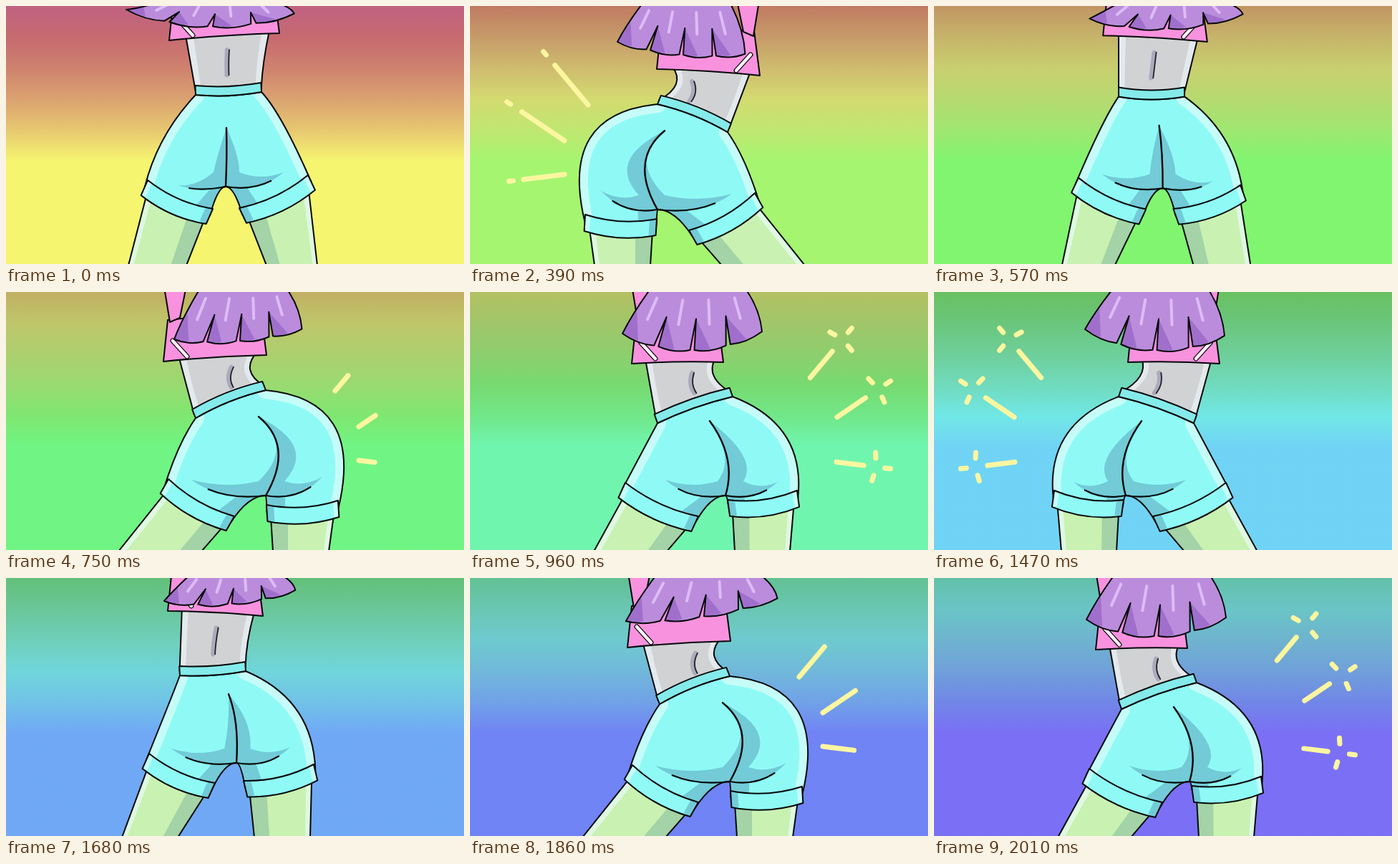
An HTML page for the animation above (2040 ms loop, 640x360 px).

```html
<!DOCTYPE html>
<html lang="en">
<head>
<meta charset="utf-8">
<title>Dance loop</title>
<style>
html, body { margin: 0; width: 100%; height: 100%; overflow: hidden; }
svg { display: block; width: 100vw; height: 100vh; }
</style>
</head>
<body>
<svg viewBox="0 0 640 360" preserveAspectRatio="none">
  <defs>
    <linearGradient id="sky" x1="0" y1="0" x2="0" y2="1"></linearGradient>
    <clipPath id="inShorts"><path id="shortsClip"/></clipPath>
  </defs>
  <rect width="640" height="360" fill="url(#sky)"/>
  <g id="figure" stroke-linecap="round" stroke-linejoin="round"></g>
</svg>
<script>
const LOOP = 2040, STEP = 30, BEAT = 510, FIRST_HIT = 240, MIRROR = 625;
const INK = '#050808', CLOTH = '#8ffaf5', CLOTH_DARK = '#72cbd7', CLOTH_LIGHT = '#c6fcf8';
const PINK = '#f992de', HAIR = '#bb8cdc', HAIR_DARK = '#a06fcc', HAIR_LIGHT = '#dcbcf6';

// Key points of the dance to the left; the other side is the mirror image.
// leg: hip bulge, outer and inner cuff end, outer and inner foot, cheek tip
const hit = {
  hem: [[261, 88], [405, 97]], waist: [[262, 137], [360, 176]], hair: [[206, 50], [390, 66]], sag: 10,
  crease: [[272, 174], [222, 215], [262, 284]],
  legA: [[124, 150], [161, 291], [261, 297], [174, 362], [252, 362], [183, 258]],
  legB: [[384, 210], [398, 261], [306, 313], [468, 362], [352, 362], [366, 262]]
};
const recoil = {
  hem: [[271, 98], [399, 100]], waist: [[258, 146], [363, 183]], hair: [[211, 52], [412, 58]], sag: 26,
  crease: [[290, 180], [252, 232], [268, 284]],
  legA: [[156, 185], [168, 277], [265, 290], [178, 362], [255, 362], [195, 265]],
  legB: [[380, 215], [408, 266], [306, 313], [452, 362], [350, 362], [352, 262]]
};
const up = {
  hem: [[243, 38], [397, 48]], waist: [[268, 120], [360, 124]], hair: [[215, 8], [457, 5]], sag: 22,
  crease: [[317, 170], [316, 210], [318, 252]],
  legA: [[240, 150], [203, 236], [299, 282], [190, 362], [261, 362], [237, 232]],
  legB: [[413, 180], [427, 243], [336, 283], [454, 362], [373, 362], [385, 250]]
};
const drop = {
  hem: [[226, 46], [359, 53]], waist: [[243, 136], [335, 130]], hair: [[221, 32], [410, 15]], sag: 12,
  crease: [[311, 162], [326, 200], [322, 258]],
  legA: [[230, 170], [200, 245], [292, 286], [162, 362], [240, 362], [231, 238]],
  legB: [[430, 170], [430, 260], [332, 283], [425, 362], [347, 362], [397, 236]]
};

const clamp = (v, lo, hi) => Math.max(lo, Math.min(hi, v));
const add = (p, x, y) => [p[0] + x, p[1] + y];

// Blends numbers, points, lists and whole poses alike.
function mix(a, b, f) {
  if (typeof a === 'number') return a + (b - a) * f;
  if (Array.isArray(a)) return a.map((v, i) => mix(v, b[i], f));
  return Object.fromEntries(Object.keys(a).map(k => [k, mix(a[k], b[k], f)]));
}

function flip(p) {
  const over = pts => pts.map(([x, y]) => [MIRROR - x, y]);
  return {
    hem: over(p.hem).reverse(), waist: over(p.waist).reverse(), hair: over(p.hair).reverse(),
    sag: p.sag, crease: over(p.crease), legA: over(p.legB), legB: over(p.legA)
  };
}

// Pose at each phase of a beat; the last key is the hit on the other side.
const KEYS = [[0, hit], [150, hit], [210, recoil], [240, recoil], [270, up], [420, drop], [BEAT, flip(hit)]];

function poseAt(phase, side) {
  const i = KEYS.findLastIndex(k => k[0] <= phase);
  const [t0, a] = KEYS[i], [t1, b] = KEYS[i + 1];
  const pose = mix(a, b, (phase - t0) / (t1 - t0));
  const flare = phase < 150 ? Math.sin(Math.PI * phase / 150) : 0;
  pose.hair = [add(pose.hair[0], -18 * flare, -25 * flare), add(pose.hair[1], 18 * flare, -6 * flare)];
  return side ? flip(pose) : pose;
}

// Fills a command template such as 'MQLZ' with points.
function trace(template, pts) {
  const need = { M: 1, L: 1, Q: 2, Z: 0 };
  let i = 0;
  return [...template].map(c => c + pts.slice(i, i += need[c])
    .map(p => p.map(v => v.toFixed(1)).join(' ')).join(' ')).join('');
}

const draw = (d, fill, stroke = 'none', width = 2, extra = '') =>
  `<path d="${d}" fill="${fill}" stroke="${stroke}" stroke-width="${width}" ${extra}/>`;
const filled = (template, pts, fill) => draw(trace(template, pts), fill);
const inked = (template, pts, fill) => draw(trace(template, pts), fill, INK);
const line = (template, pts, color = INK, width = 2, extra = '') =>
  draw(trace(template, pts), 'none', color, width, extra);

// A strip along edge a, reaching the fraction f of the way to edge b.
const strip = (a, b, f, fill) =>
  filled(a.length > 2 ? 'MQLQZ' : 'MLLLZ', [...a, ...mix(a, b, f).reverse()], fill);

// The segment ab moved downwards by d at a right angle.
function below([a, b], d) {
  const x = b[0] - a[0], y = b[1] - a[1], k = d * Math.sign(x) / Math.hypot(x, y);
  return [add(a, -y * k, x * k), add(b, -y * k, x * k)];
}

// The curve from a to b that sags downwards, as three points.
function bowed([a, b], sag) {
  const [c, d] = below([a, b], sag);
  return [a, mix(c, d, .5), b];
}

const cuffLine = (leg, drop) => bowed(below([leg[1], leg[2]], drop), 13);

function drawLeg(leg) {
  const [outTop, , inTop] = cuffLine(leg, 14);
  const outer = [mix(outTop, inTop, .06), leg[3]], inner = [mix(inTop, outTop, .05), leg[4]];
  return filled('MLLLZ', [...outer, ...[...inner].reverse()], '#c8f1b2') +
    strip(inner, outer, .27, '#a3d3a6') + strip(outer, inner, .09, '#dff8e2') +
    line('ML', outer) + line('ML', inner);
}

function drawCuff(leg) {
  const top = cuffLine(leg, 0), low = cuffLine(leg, 23);
  const band = [...top, ...[...low].reverse()];
  return filled('MQLQZ', band, CLOTH) + strip([top[2], low[2]], [top[0], low[0]], .1, CLOTH_DARK) +
    strip([top[0], low[0]], [top[2], low[2]], .07, CLOTH_LIGHT) + line('MQLQZ', band);
}

// Shadow between the crease and the lower edge of one cheek.
function cheek(tip, [top, bend, fork], width) {
  const dir = Math.sign(tip[0] - fork[0]);
  const low = [mix(tip[0], fork[0], .4), fork[1] + 8];
  const notch = add(fork, dir * (10 + width), -20);
  return {
    shade: filled('MQQQQZ', [tip, low, fork, bend, top, add(bend, dir * width * 2, 0), notch,
      add(mix(tip, notch, .5), 0, 12), tip], CLOTH_DARK),
    fold: line('MQ', [fork, low, tip], INK, 2.2, 'pathLength="100" stroke-dasharray="75 200"')
  };
}

function drawShorts({ waist, legA, legB, crease }, slope, bow) {
  const fork = crease[2], a = cuffLine(legA, 10), b = cuffLine(legB, 10).reverse();
  const arch = p => [mix(p[0], fork[0], .5), fork[1]];
  const body = trace('MQQQQQQQZ', [waist[0], legA[0], a[0], a[1], a[2], arch(a[2]), fork,
    arch(b[0]), b[0], b[1], b[2], legB[0], waist[1], ...bowed(waist, bow).slice(0, 2).reverse()]);
  document.getElementById('shortsClip').setAttribute('d', body);
  const cheeks = [cheek(legA[5], crease, Math.max(0, 8 + 20 * slope)),
    cheek(legB[5], crease, Math.max(0, 8 - 20 * slope))];
  const under = (inner, outer, tip) => filled('MLLLZ',
    [fork, inner, mix(inner, outer, .25), add(mix(fork, tip, .35), 0, 6)], CLOTH_DARK);
  return draw(body, CLOTH) + '<g clip-path="url(#inShorts)">' +
    under(a[2], a[0], legA[5]) + under(b[0], b[2], legB[5]) +
    line('MQMQ', [waist[0], legA[0], a[0], waist[1], legB[0], b[2]], CLOTH_LIGHT, 24) +
    cheeks.map(c => c.shade).join('') + '</g>' + draw(body, 'none', INK) +
    cheeks.map(c => c.fold).join('') + line('MQ', crease, INK, 2.4);
}

function drawWaist(waist, bow) {
  return inked('MQLQZ', [...bowed(below(waist, -13), bow), ...bowed(waist, bow).reverse()], '#84ebea');
}

function drawTorso({ hem, waist }, slope) {
  const belt = below(waist, -6), pinch = 75 * slope;
  const top = [mix(hem[0], hem[1], .15), mix(hem[0], hem[1], .91)].map(p => add(p, 0, -5));
  const side = (i, x) => [top[i], add(mix(top[i], belt[i], .55), x, 0), belt[i]];
  const left = side(0, Math.max(0, pinch)), right = side(1, Math.min(0, pinch));
  const outline = [...left, ...[...right].reverse()];
  const from = mix(top[0], top[1], .5 - .5 * slope), to = mix(belt[0], belt[1], .5 - .15 * slope);
  const navel = [mix(from, to, .3), add(mix(from, to, .55), 20 * slope, 0), mix(from, to, .75)];
  return filled('MQLQZ', outline, '#d0d2d4') + strip(left, right, .09, '#e3e9ec') +
    strip(right, left, .09, '#e3e9ec') + line('MQ', navel.map(p => add(p, -3, 0)), '#aaaabb', 6) +
    line('MQ', navel, '#202028', 1.8) + line('MQLQZ', outline);
}

// The arm and the strap are on the side towards which the waist slopes down.
function drawShirt([left, right], slope) {
  const dir = slope < 0 ? -1 : 1, corner = slope < 0 ? left : right;
  const at = (x, y) => add(corner, dir * x, y);
  const strap = [at(-33, -7), at(-13, -29)];
  return inked('MLQLZ', [add(left, 6, -58), left, add(mix(left, right, .5), 0, -3), right,
    add(right, -8, -62)], PINK) +
    line('ML', strap, INK, 7) + line('ML', strap, '#fff0fc', 4.5) +
    inked('MLLLZ', [at(-33, -110), at(0, -110), at(-9, -55), at(-23, -61)], PINK);
}

function drawHair([left, right], sag) {
  const LOCKS = 4;
  const edge = f => add(mix(left, right, f), 0, sag * 4 * f * (1 - f));
  const root = f => [mix(left[0], right[0], .2 + .65 * f), -6];
  const notch = f => mix(root(f), edge(f), .5);
  const outline = [root(0)];
  let detail = '';
  for (let i = 0; i < LOCKS; i++) {
    const from = i / LOCKS, to = (i + .88) / LOCKS, mid = (from + to) / 2, end = (i + 1) / LOCKS;
    const belly = add(edge(mid), 0, 6);
    const start = i ? [] : [add(mix(root(0), edge(0), .5), -6, 4)];
    outline.push(...start, edge(from), belly, edge(to));
    if (i < LOCKS - 1) outline.push(notch(end));
    detail += filled('MLQZ', [notch(from), edge(from), mix(edge(from), belly, .5), edge(mid)], HAIR_DARK) +
      line('ML', [mix(root(mid), edge(mid), .2), mix(root(mid), edge(mid), .6)], HAIR_LIGHT, 4);
  }
  outline.push(add(mix(root(1), edge(1), .5), 6, 0), root(1));
  const template = 'MQQ' + 'LLQ'.repeat(LOCKS - 1) + 'QZ';
  return filled(template, outline, HAIR) + detail + line(template, outline);
}

function burst(phase, side) {
  if (phase > 240) return '';
  const near = clamp((phase - 150) * .4, 0, 30), far = Math.min(72, 28 + .3 * phase);
  const spread = clamp((phase - 150) * .27, 0, 17);
  const polar = (o, r, deg) => add(o, r * Math.cos(deg * Math.PI / 180), r * Math.sin(deg * Math.PI / 180));
  const dash = (o, r1, r2, deg) => line('ML', [polar(o, r1, deg), polar(o, r2, deg)], '#fbf6a0', 7);
  // origin, direction and reach of each ray
  const rays = [[[165, 138], -130, 1], [[132, 188], -146, 1], [[132, 235], 173, .8]].map(([o, deg, reach]) => {
    const hub = polar(o, 94 * reach, deg);
    const shards = spread ? [-100, 0, 100].map(a => dash(hub, spread - 4, spread + 4, deg + a)).join('')
      : phase >= 120 ? dash(hub, -3, 3, deg) : '';
    return dash(o, near * reach, far * reach, deg) + shards;
  }).join('');
  return `<g transform="${side ? `translate(${MIRROR} 0) scale(-1 1)` : ''}">${rays}</g>`;
}

// The hue turns with time; the upper part of the stage lags behind and is duller.
function sky(t) {
  const hue = 60 + .092 * t;
  return [0, .2, .4, .6, .8, 1].map(f =>
    `<stop offset="${f * .6}" stop-color="hsl(${hue - 80 * (1 - f)} ${43 + 44 * f * f}% ${57 + 13 * f}%)"/>`).join('');
}

const skyGradient = document.getElementById('sky');
const figure = document.getElementById('figure');

function render(t) {
  const beat = Math.floor((t - FIRST_HIT) / BEAT), side = beat & 1;
  const phase = t - FIRST_HIT - beat * BEAT;
  const p = poseAt(phase, side);
  const [l, r] = p.waist, slope = (r[1] - l[1]) / (r[0] - l[0]);
  const bow = 8 - 40 * Math.abs(slope);
  skyGradient.innerHTML = sky(t);
  figure.innerHTML = burst(phase, side) + drawLeg(p.legA) + drawLeg(p.legB) + drawTorso(p, slope) +
    drawShorts(p, slope, bow) + drawWaist(p.waist, bow) + drawCuff(p.legA) + drawCuff(p.legB) +
    drawShirt(p.hem, slope) + drawHair(p.hair, p.sag);
}

let shown = -1;
function tick(now) {
  let t = Math.floor(now % LOOP / STEP) * STEP;
  if (t < 2 * STEP) t = 0;
  if (t !== shown) render(shown = t);
  requestAnimationFrame(tick);
}
render(0);
requestAnimationFrame(tick);
</script>
</body>
</html>
```
